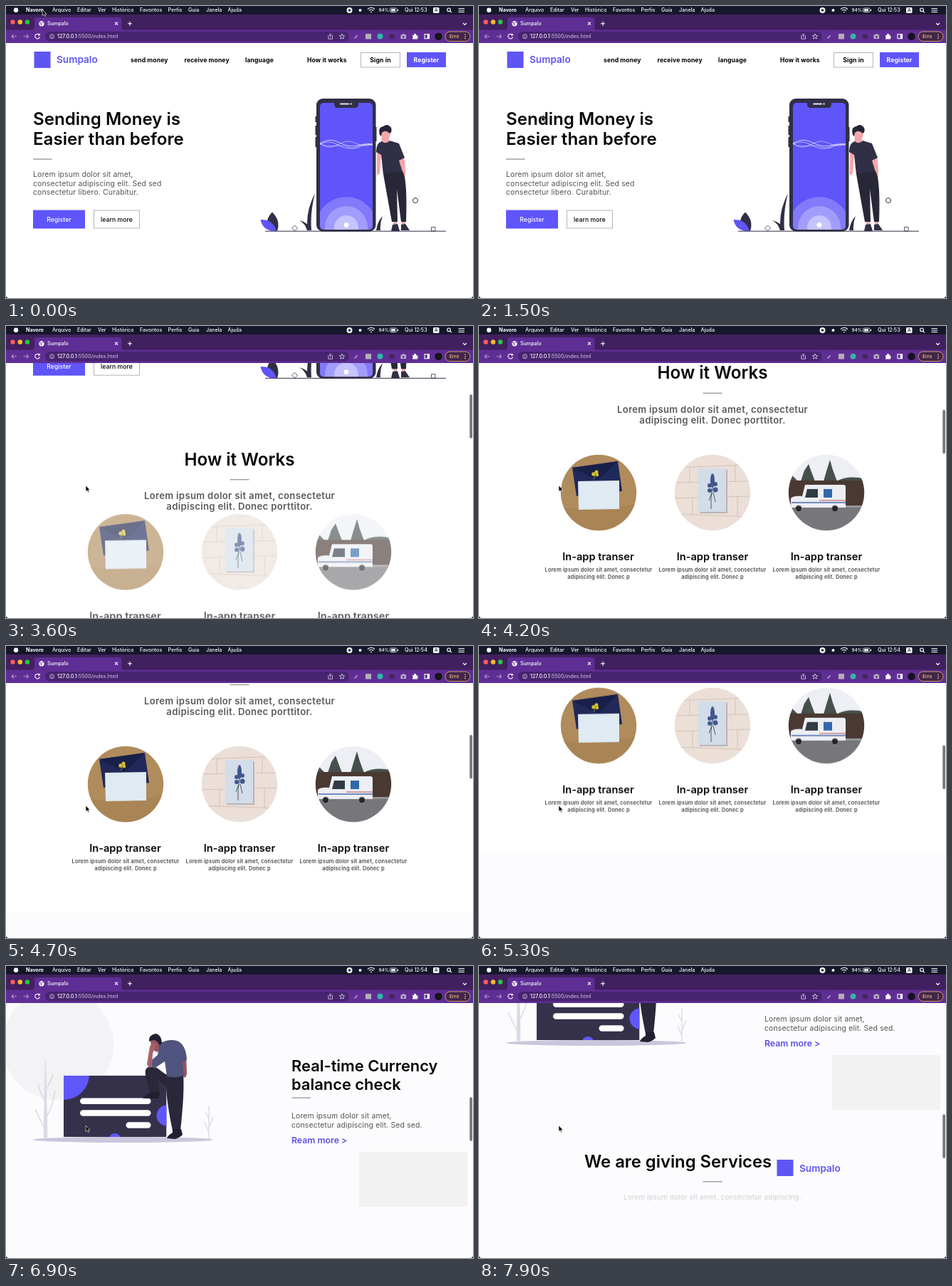
An HTML page for the animation above (8000 ms loop, 656 px wide and 410 px high).

```html
<!DOCTYPE html>
<html lang="pt">
<head>
<meta charset="utf-8">
<title>Sumpalo</title>
<style>
@property --s { syntax: "<number>"; inherits: true; initial-value: 0; }
html, body { margin: 0; width: 100%; height: 100%; overflow: hidden; background: #fff; }
svg { display: block; width: 656px; height: 410px; font-family: Inter, "Open Sans", sans-serif; animation: scroll 8s linear infinite; }

.page { transform: translateY(calc(var(--s) * -1px)); }
.thumb { transform: translateY(calc(var(--s) * .1777px)); animation: thumb 8s step-end infinite; }
.mid { text-anchor: middle; }
.h { font-weight: 600; fill: #060606; }
.nav { font-size: 8.6px; font-weight: 700; letter-spacing: .12px; }
.btn { font-size: 8.6px; font-weight: 500; letter-spacing: .08px; }
.brand { font-size: 13.6px; font-weight: 600; fill: #5f55ee; }
.body { font-size: 10.4px; letter-spacing: .16px; fill: #555; }
.lead { font-size: 13.2px; font-weight: 600; letter-spacing: .3px; fill: #5c5c5c; }
.note { font-size: 7.4px; font-weight: 600; letter-spacing: .18px; fill: #4c4c4c; }
.ui { font-size: 7.1px; font-weight: 500; fill: #fff; }
.line { stroke: #9a9aa0; stroke-width: 1.4; }

.title, .sub, .cards, .art, .real, .rule, .blurb, .more, .panel, .serv, .tail, .cursor, .t1, .t2 {
  animation: 8s linear infinite;
}
.title { animation-name: title; }
.sub { animation-name: sub; }
.cards { animation-name: cards; }
.art { animation-name: art; }
.real { animation-name: real; }
.rule { animation-name: rule; }
.blurb { animation-name: blurb; }
.more { animation-name: more; }
.panel { animation-name: panel; }
.serv { animation-name: serv; }
.tail { animation-name: tail; }
.cursor { animation-name: cursor; }
.t1, .t2 { animation-timing-function: step-end; }
.t1 { animation-name: before; }
.t2 { animation-name: after; }

@keyframes scroll {
  0%, 28.75% { --s: 0; } 30% { --s: 2; } 32.5% { --s: 8; } 35% { --s: 34; }
  37.5% { --s: 75; } 40% { --s: 130; } 42.5% { --s: 190; } 45% { --s: 242.6; }
  48% { --s: 302; } 51.25% { --s: 352; } 55% { --s: 388; } 58.75% { --s: 404; }
  62.5% { --s: 428; } 66.25% { --s: 486; } 70% { --s: 562; } 73.75% { --s: 622; }
  77.5% { --s: 672; } 82% { --s: 716; } 86.25% { --s: 738; } 89% { --s: 762; }
  92.5% { --s: 816; } 95.5% { --s: 853; } 98.75% { --s: 874; } 100% { --s: 878; }
}
@keyframes thumb { 0% { opacity: 0; } 28.8%, 100% { opacity: 1; } }
@keyframes title { 0%, 41% { opacity: 0; } 44.6%, 100% { opacity: 1; } }
@keyframes sub { 0%, 42.5% { opacity: 0; } 45%, 100% { opacity: 1; } }
@keyframes cards {
  0%, 42.5% { opacity: 0; transform: translateY(-45px); }
  45% { opacity: .64; transform: translateY(-38px); }
  48% { opacity: .88; transform: translateY(-14px); }
  52.5%, 100% { opacity: 1; transform: none; }
}
@keyframes art {
  0%, 67% { opacity: 0; transform: translateX(-100px); }
  69.5% { opacity: .6; transform: translateX(-30px); }
  73%, 100% { opacity: 1; transform: none; }
}
@keyframes real {
  0%, 68.5% { opacity: 0; transform: translateX(110px); }
  71.25% { opacity: .65; transform: translateX(34px); }
  73.75% { opacity: 1; transform: translateX(4px); }
  75%, 100% { opacity: 1; transform: none; }
}
@keyframes rule {
  0%, 69.5% { opacity: 0; transform: translateX(110px); }
  73.75% { opacity: .7; transform: translateX(7px); }
  75.5%, 100% { opacity: 1; transform: none; }
}
@keyframes blurb {
  0%, 72.5% { opacity: 0; transform: translateX(110px); }
  73.75% { opacity: .14; transform: translateX(89px); }
  76.25% { opacity: .7; transform: translateX(28px); }
  79.5%, 100% { opacity: 1; transform: none; }
}
@keyframes more {
  0%, 75% { opacity: 0; transform: translateX(110px); }
  78% { opacity: .65; transform: translateX(30px); }
  82%, 100% { opacity: 1; transform: none; }
}
@keyframes panel { 0%, 76% { opacity: 0; } 82%, 100% { opacity: 1; } }
@keyframes serv { 0%, 93% { opacity: 0; } 97.5%, 100% { opacity: 1; } }
@keyframes tail { 0%, 97% { opacity: 0; } 98.75% { opacity: .24; } 100% { opacity: .42; } }
@keyframes cursor {
  0%, 1.25% { transform: translate(51px, 5px); animation-timing-function: ease-in-out; }
  7.5%, 8.75% { transform: translate(48px, 38px); animation-timing-function: ease-in-out; }
  26.25%, 100% { transform: translate(112px, 224px); }
}
@keyframes before { 0% { opacity: 1; } 56.25%, 100% { opacity: 0; } }
@keyframes after { 0% { opacity: 0; } 56.25%, 100% { opacity: 1; } }
</style>
</head>
<body>
<svg viewBox="0 0 656 410">
<defs>
  <clipPath id="screen"><rect x="441" y="136" width="74" height="178" rx="5"/></clipPath>
  <clipPath id="card"><rect x="81" y="270" width="144.500" height="86"/></clipPath>
  <clipPath id="disc"><circle r="53.200"/></clipPath>
</defs>
<rect width="656" height="410" fill="#fff"/>

<g class="page">
  <rect y="779" width="656" height="700" fill="#fcfbfd"/>

  <!-- header -->
  <rect x="39.500" y="64" width="23" height="23" fill="#5f55f5"/>
  <text class="brand" x="71" y="80">Sumpalo</text>
  <g class="nav">
    <text x="175" y="78.500">send money</text>
    <text x="250.500" y="78.500">receive money</text>
    <text x="336" y="78.500">language</text>
    <text x="423" y="78.500">How it works</text>
    <rect x="498.500" y="65.500" width="55" height="20.500" fill="#fff" stroke="#b5b5b9"/>
    <rect x="563" y="65" width="55" height="21" fill="#5f55f9"/>
    <text class="mid" x="526" y="78.500">Sign in</text>
    <text class="mid" x="590.500" y="78.500" fill="#fff">Register</text>
  </g>

  <!-- hero -->
  <g class="h" font-size="24.100">
    <text x="38" y="167">Sending Money is</text>
    <text x="38" y="194.500">Easier than before</text>
  </g>
  <path class="line" d="M38 215H64.500"/>
  <g class="body">
    <text x="38" y="240.300">Lorem ipsum dolor sit amet,</text>
    <text x="38" y="252.600">consectetur adipiscing elit. Sed sed</text>
    <text x="38" y="264.900">consectetur libero. Curabitur.</text>
  </g>
  <rect x="38" y="286.500" width="73" height="26" fill="#5f55f9"/>
  <rect x="123.500" y="287" width="64" height="25" fill="#fff" stroke="#b5b5b9"/>
  <text class="btn mid" x="74.500" y="302.700" fill="#fff">Register</text>
  <text class="btn mid" x="155.500" y="302.700">learn more</text>

  <!-- phone -->
  <g fill="#302f45">
    <path d="M434.500 155h3v8h-3zM434.500 168h3v13h-3zM434.500 184h3v14h-3zM518 170h2.500v20h-2.500z"/>
    <rect x="436" y="130" width="83.500" height="186.500" rx="9"/>
    <path d="M424 315Q420 290 434 263Q427 290 429 315ZM423 315Q420 305 412 301Q424 303 428 315ZM520 315Q522 302 529 295Q525 305 526 315Z"/>
    <path d="M370 315Q362 301 374 289.500Q386 301 381 316Z"/>
  </g>
  <path d="M380 316Q361 317 357.500 300Q375 299 380 316Z" fill="#5f55f9"/>
  <g clip-path="url(#screen)">
    <rect x="441" y="136" width="74" height="178" fill="#5f55f9"/>
    <g fill="#fff">
      <circle cx="478" cy="311" r="43" opacity=".22"/>
      <circle cx="478" cy="311" r="30" opacity=".26"/>
      <circle cx="478" cy="311" r="17" opacity=".38"/>
      <circle cx="478" cy="307.500" r="3.400"/>
    </g>
    <g fill="none" stroke="#fff" stroke-width=".7">
      <path d="M441 193C460 182 468 194 480 196S500 193 515 195"/>
      <path d="M441 194C460 185 466 199 482 200S502 192 515 194" opacity=".8"/>
      <path d="M441 192C456 206 467 191 479 190S500 202 515 193" opacity=".75"/>
      <path d="M441 194C455 200 469 193 481 198S501 188 515 195" opacity=".6"/>
    </g>
    <path d="M461 135H495V138Q495 143 490 143H466Q461 143 461 138Z" fill="#302f45"/>
  </g>
  <path d="M470 137.500H481M484 137.500H485" stroke="#e6e5f2" stroke-width="1.800" stroke-linecap="round"/>

  <!-- man by the phone -->
  <path d="M528 180H538V196H527ZM551 210L559 211Q563 233 559 254L555 255Q554 230 550 215ZM521 205L527 208L525 235L521 238ZM544 300H549V309H544ZM556 300H561V309H556Z" fill="#f5a6aa"/>
  <ellipse cx="533.500" cy="180" rx="6.200" ry="8" fill="#f5a6aa"/>
  <path d="M525 181Q522 170 530 169Q536 164 541 171Q543 176 539 179Q533 173 528 178L527 183Z" fill="#262536"/>
  <path d="M520 205Q520 192 528 190Q534 195 539 189L552 193L560 213L552 217L557 233L530 237L527 209Z" fill="#302f45"/>
  <path d="M530 236L557 232Q564 242 562 303H555L549 257L550 303H542Q536 270 530 236Z" fill="#282737"/>
  <path d="M543 307L550 306L553 316H541ZM555 307L561 306L567 315H555Z" fill="#302f45"/>
  <g fill="none" stroke="#302f45">
    <path d="M364 316.200H618"/>
    <circle cx="575" cy="273" r="3.500"/>
    <path d="M405.500 308L409.500 312L405.500 316L401.500 312ZM597.500 310.500H603V316H597.500Z" stroke-width=".8"/>
  </g>

  <!-- how it works -->
  <g class="title">
    <text class="h mid" x="328" y="438.500" font-size="24.200">How it Works</text>
    <path class="line" d="M314.500 458.500H341.500"/>
  </g>
  <g class="sub lead mid">
    <text x="328" y="486">Lorem ipsum dolor sit amet, consectetur</text>
    <text x="328" y="501.300">adipiscing elit. Donec porttitor.</text>
  </g>
  <g transform="translate(0 404)"><g class="cards">
    <g transform="translate(168 194)"><g clip-path="url(#disc)">
      <rect x="-54" y="-54" width="108" height="108" fill="#b08b5c"/>
      <path d="M-54 20Q0 30 54 15V54H-54Z" fill="#a98455"/>
      <path d="M-37 -35L27 -44L33 -2L-31 5Z" fill="#20295a"/>
      <path d="M-37 -35L-1 -17L27 -44" fill="#18204a"/>
      <path d="M-29 -16L29 -17V23L-28 24Z" fill="#dfeaf3"/>
      <path d="M-7 -19L-3 -26" stroke="#68752c" stroke-width="1.500"/>
      <g fill="#d6c22f"><circle cx="-7" cy="-26" r="2.700"/><circle cx="-3" cy="-29" r="2.500"/><circle cx="-2" cy="-25" r="2.200"/></g>
    </g></g>
    <g transform="translate(328 194)"><g clip-path="url(#disc)">
      <rect x="-54" y="-54" width="108" height="108" fill="#ebdfd7"/>
      <path d="M-54 -35L54 -39M-54 -14L54 -16M-54 8L54 5M-54 30L54 34M-32 -36V-14M32 -38V-15M-28 8V31M35 5V33" stroke="#d3c3b9" fill="none"/>
      <rect x="-18" y="-32" width="39" height="61" fill="#b9b3ba"/>
      <rect x="-20" y="-34" width="39" height="61" fill="#d3dde9"/>
      <path d="M0 -8Q-3 8 -2 23M1 0L4 13M-1 0L-5 11" fill="none" stroke="#4a5d68"/>
      <g fill="#41578f"><ellipse cx="0" cy="-17" rx="3" ry="10"/><circle cx="-4" cy="-10" r="3"/><circle cx="4" cy="-12" r="3"/><circle cx="-4" cy="-3" r="3"/><circle cx="4" cy="-4" r="3.500"/></g>
    </g></g>
    <g transform="translate(488 194)"><g clip-path="url(#disc)">
      <rect x="-54" y="-54" width="108" height="108" fill="#eeeff4"/>
      <path d="M-36 -16L-31 -31L-25 -40L-21 -29L-16 -16ZM-4 -16L0 -30L5 -46L9 -32L15 -16ZM-54 -16L-48 -24L-40 -16ZM14 -16Q32 -25 54 -19V-14Z" fill="#46504b"/>
      <path d="M-54 -17H54V20H-54Z" fill="#493932"/>
      <rect x="-54" y="18" width="108" height="36" fill="#77777b"/>
      <path d="M-54 19.500H54" stroke="#a4a3a4" stroke-width="2"/>
      <path d="M-30 -11H24Q27 -11 27 -8V21H-50V8Q-46 4 -34 5Z" fill="#eceef2"/>
      <path d="M-27 -5H-12V7H-30Z" fill="#303b46"/>
      <path d="M-49 14H27" stroke="#496aad" stroke-width="1.300"/>
      <path d="M-10 11H27" stroke="#bb4f55"/>
      <rect x="-4" y="-5" width="12" height="12" fill="#3267ad"/>
      <g fill="#242529" stroke="#939397"><circle cx="-39" cy="22.500" r="4.500"/><circle cx="12" cy="22.500" r="4.500"/></g>
    </g></g>
    <g class="h mid" font-size="14.600">
      <text x="167.500" y="289">In-app transer</text>
      <text x="328" y="289">In-app transer</text>
      <text x="488" y="289">In-app transer</text>
    </g>
    <g class="note mid">
      <text x="168" y="305">Lorem ipsum dolor sit amet, consectetur</text>
      <text x="328" y="305">Lorem ipsum dolor sit amet, consectetur</text>
      <text x="488" y="305">Lorem ipsum dolor sit amet, consectetur</text>
      <text x="168" y="314.500">adipiscing elit. Donec p</text>
      <text x="328" y="314.500">adipiscing elit. Donec p</text>
      <text x="488" y="314.500">adipiscing elit. Donec p</text>
    </g>
  </g></g>

  <!-- balance check -->
  <g transform="translate(0 622)">
    <g class="art">
      <circle cx="73" cy="226.500" r="78" fill="#f3f2f4"/>
      <ellipse cx="164.500" cy="360" rx="126.500" ry="4" fill="#c9c6dc"/>
      <g fill="none" stroke="#dcd9e6">
        <path d="M53 357L55.500 248L58 357Z" fill="#dcd9e6"/>
        <path d="M55 346Q45 326 41 317M56 330Q66 312 69 291M55 307Q47 292 45 281M56 289Q64 278 66 268" stroke-width="1.500"/>
        <path d="M285 359V312M285 350L279 336M285 343L291 328M285 330L280 320" stroke-width="1.300"/>
      </g>
      <g clip-path="url(#card)">
        <rect x="81" y="270" width="144.500" height="86" fill="#35314b"/>
        <g fill="#6057fa"><circle cx="81" cy="268" r="36"/><circle cx="226" cy="326" r="14.500"/><circle cx="153" cy="359" r="8"/></g>
      </g>
      <g fill="#fff">
        <rect x="104" y="301.500" width="99.500" height="8.500" rx="4.250"/>
        <rect x="104" y="318.300" width="99.500" height="8.500" rx="4.250"/>
        <rect x="168.500" y="335.300" width="35" height="8.500" rx="4.250"/>
      </g>
      <!-- leaning man -->
      <path d="M247 240H253L254 268L252 273L248 271Z" fill="#96555f"/>
      <path d="M224 268H249Q251 292 245 347H234Q226 310 225 286L214 277L216 297H204Q194 270 196 262Q199 255 212 259Z" fill="#292739"/>
      <path d="M195 299Q202 291 216 295L214 302H192ZM234 345H246L248 353Q243 358 237 359L226 358Q227 354 234 350Z" fill="#211f30"/>
      <path d="M203 219Q216 210 219 224L222 231L212 237Q203 234 203 219Z" fill="#96555f"/>
      <path d="M216 225Q228 218 240 221Q253 226 254 248L248 252L250 270Q238 274 226 271L223 250L208 260L199 253L213 241Z" fill="#50547f"/>
      <path d="M198 254L202 229Q206 222 211 226L206 239L205 258Q201 260 198 254Z" fill="#a5626c"/>
      <path d="M201 222Q200 213 210 211Q218 212 219 224L216 228Q211 217 204 221Z" fill="#211f30"/>
    </g>
    <g class="real h" font-size="21.900">
      <text x="401" y="264.500">Real-time Currency</text>
      <text x="401" y="290">balance check</text>
    </g>
    <path class="rule line" d="M401.500 301.200H428"/>
    <g class="blurb body">
      <text x="401" y="330.500">Lorem ipsum dolor sit amet,</text>
      <text x="401" y="342.800">consectetur adipiscing elit. Sed sed.</text>
    </g>
    <text class="more" x="401" y="365" font-size="12.300" font-weight="600" fill="#5a50e0">Ream more &gt;</text>
    <rect class="panel" x="496" y="377" width="152" height="77" fill="#f3f2f3"/>
  </g>

  <!-- services -->
  <g transform="translate(0 874)">
    <g class="serv">
      <text class="h" x="148" y="283.300" font-size="23.800">We are giving Services</text>
      <rect x="418.500" y="272" width="23" height="23" fill="#5f55f5"/>
      <text class="brand" x="450" y="289">Sumpalo</text>
      <path class="line" d="M314.500 302.800H341.500"/>
    </g>
    <text class="tail mid" x="328" y="328" font-size="9.600" font-weight="500" letter-spacing=".25" fill="#5c5c5c">Lorem ipsum dolor sit amet, consectetur adipiscing.</text>
  </g>
</g>

<rect class="thumb" x="651.300" y="53" width="3.700" height="61.500" rx="1.850" fill="#77767a"/>

<!-- browser window -->
<rect width="656" height="52" fill="#5f2e95"/>
<rect width="656" height="33.500" fill="#41205f"/>
<rect width="656" height="12" fill="#16172b"/>
<path d="M36 34Q40 34 40 30V20Q40 16 44 16H158Q162.500 16 162.500 20V30Q162.500 34 166 34Z" fill="#5f2e95"/>
<circle cx="9.500" cy="22.500" r="3.200" fill="#fb5f57"/>
<circle cx="19.800" cy="22.500" r="3.200" fill="#fcbb2e"/>
<circle cx="30" cy="22.500" r="3.200" fill="#28c840"/>
<rect x="55" y="36" width="427" height="13.500" rx="6.750" fill="#472370"/>

<g class="ui">
  <circle cx="14" cy="5.800" r="3.200"/>
  <text x="28" y="8.400" font-weight="700">Navoro</text>
  <text x="65" y="8.400">Arquivo</text>
  <text x="100" y="8.400">Editar</text>
  <text x="129" y="8.400">Ver</text>
  <text x="149" y="8.400">Histórico</text>
  <text x="188" y="8.400">Favoritos</text>
  <text x="227.500" y="8.400">Perfis</text>
  <text x="256" y="8.400">Guia</text>
  <text x="281" y="8.400">Janela</text>
  <text x="311.500" y="8.400">Ajuda</text>
  <text x="523.500" y="8.200" font-size="6.400">94%</text>
  <text class="t1" x="560" y="8.400">Qui 12:53</text>
  <text class="t2" x="560" y="8.400">Qui 12:54</text>
  <circle cx="482.500" cy="6" r="4"/><rect x="481" y="4.500" width="3" height="3" fill="#16172b"/>
  <circle cx="497.500" cy="6" r="2"/>
  <rect x="600" y="2" width="8.500" height="8" rx="1.500"/>
  <text class="mid" x="604.200" y="8.400" font-size="6.500" style="fill:#16172b">A</text>
  <text x="58" y="27">Sumpalo</text>
  <text x="72" y="45.300">127.0.0.1<tspan fill="#c3b3d5">:5500/index.html</tspan></text>
</g>

<g fill="none" stroke="#fff" stroke-width="1.100">
  <path d="M508 4.500Q513 0 518 4.500M510 6.500Q513 4 516 6.500M512 8.500H514"/>
  <rect x="539.500" y="3" width="9.500" height="5.500" rx="1.500" stroke-width=".8"/>
  <path d="M541 5.800H547" stroke-width="3"/><path d="M550.600 4.700V7"/>
  <circle cx="622" cy="5.300" r="2.300"/><path d="M623.700 7L626 9.300"/>
  <path d="M635.500 3.500H644M635.500 6H644M635.500 8.500H644"/>
  <path d="M153 22.700L157 26.700M157 22.700L153 26.700M171 24.700H177M174 21.700V27.700M642 24L644.500 26.500L647 24"/>
  <path d="M15 42.700H8M11 39.700L8 42.700L11 45.700M24.500 42.700H31.500M28.500 39.700L31.500 42.700L28.500 45.700" opacity=".5"/>
  <path d="M46.800 40.700A3.300 3.300 0 1 0 47.300 43.500M47.200 38.800V41H45"/>
  <g stroke="#d8cbe6" stroke-width=".9">
    <circle cx="64.500" cy="42.700" r="3"/><path d="M64.500 42V44.500M64.500 40.700V41.200"/>
    <path d="M453.500 41.500H452.800V46.200H458.500V41.500H457.800M455.650 44V39.300M454 40.800L455.650 39.200L457.300 40.800"/>
    <path d="M472 39L473 41.500L475.700 41.700L473.600 43.500L474.300 46.200L472 44.700L469.700 46.200L470.400 43.500L468.300 41.700L471 41.500Z"/>
  </g>
  <path d="M489.500 45.500L493.500 41.500" stroke="#c9bdd2"/>
  <rect x="588" y="39.700" width="6.500" height="6"/><path d="M593 40V46" stroke-width="2.500"/>
</g>
<circle cx="50" cy="24.700" r="3.700" fill="#f2edf7"/>
<path d="M47 23L50 24.500L49 27M51 22L53 23.500" stroke="#5f2e95" fill="none"/>
<rect x="505" y="39" width="8" height="7.500" fill="#b4adba"/>
<circle cx="525.500" cy="42.700" r="3.900" fill="#2eb9a0"/>
<rect x="538.500" y="39.700" width="7" height="6" rx="1" fill="#432653"/>
<path d="M554.500 40.500H556.500L557.200 39.300H559.800L560.500 40.500H562V46H554.500Z" fill="#b9b3bd"/>
<circle cx="558.300" cy="43.200" r="1.500" fill="#5f2e95"/>
<path d="M571 41H573Q572.700 38.700 574.500 38.700T576 41H578V43Q579.800 43.500 578 45V46.500H571V44.500Q573 43.700 571 42.700Z" fill="#fff"/>
<circle cx="607.500" cy="42.700" r="5.300" fill="#17131c"/>
<rect x="617" y="36" width="35" height="13.500" rx="6.750" fill="#42264c" stroke="#d5a95c" stroke-width=".9"/>
<text x="623" y="45" font-size="6.800" font-weight="500" fill="#f5cb79">Erro</text>
<g fill="#f5cb79"><circle cx="645" cy="40" r=".8"/><circle cx="645" cy="42.700" r=".8"/><circle cx="645" cy="45.400" r=".8"/></g>
<path d="M0 406Q0 410 4 410H0ZM656 406Q656 410 652 410H656Z" fill="#17131c"/>

<g class="cursor">
  <path d="M0 0V8.400L2 6.700L3.400 9.600L4.700 9L3.400 6.200H6Z" fill="#050505" stroke="#fff" stroke-width=".6"/>
</g>
</svg>
</body>
</html>
```
